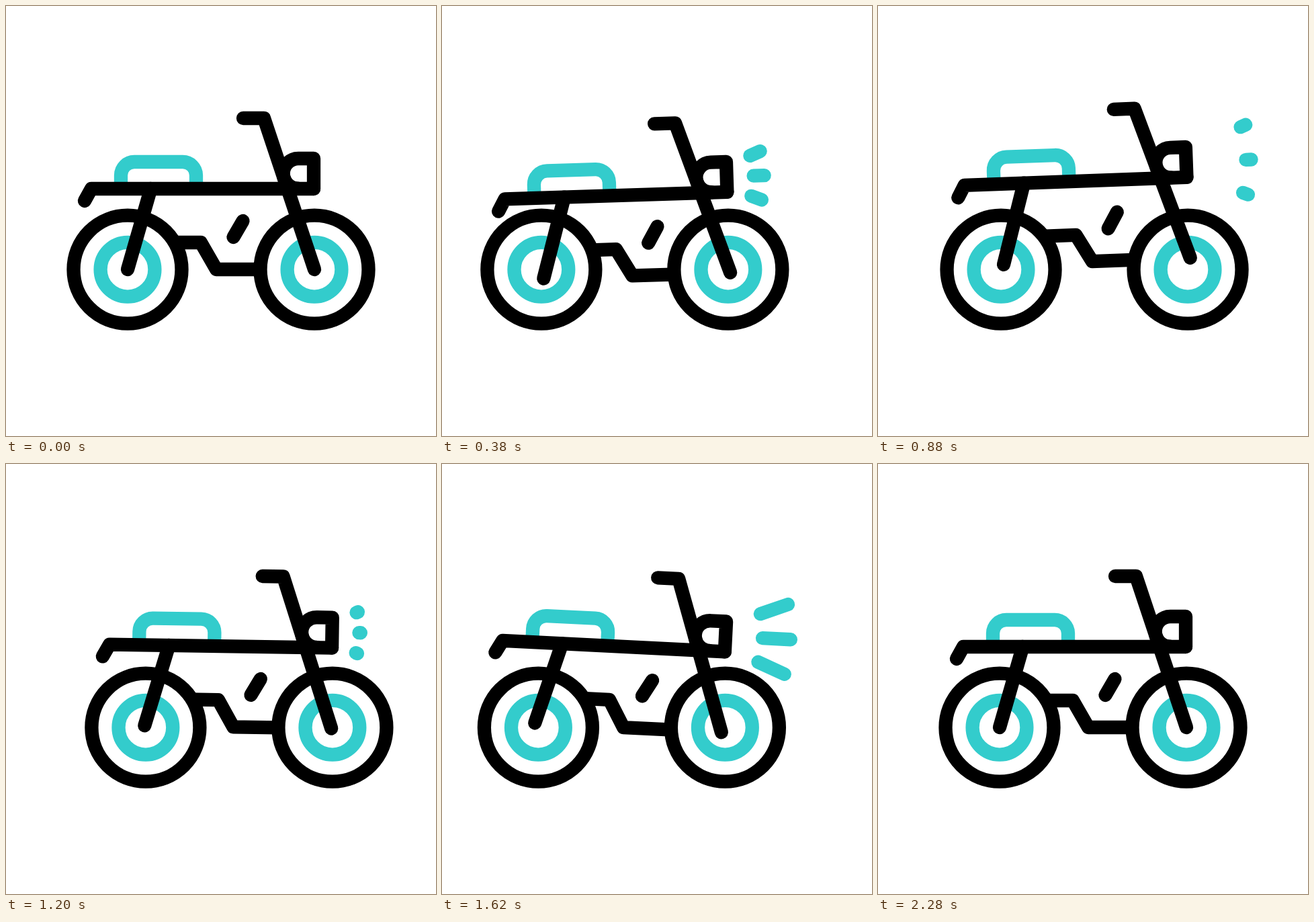
Animation, 640 px wide and 640 px high, one loop 2400 ms. Source, as an HTML page with a canvas:

```html
<!DOCTYPE html>
<html lang="en">
<head>
<meta charset="utf-8">
<title>Motorbike</title>
<style>
  html, body { margin: 0; width: 100%; height: 100%; overflow: hidden; background: #fff; }
  canvas { display: block; width: 100vmin; height: 100vmin; }
</style>
</head>
<body>
<canvas id="stage" width="640" height="640"></canvas>
<script>
const ctx = document.getElementById('stage').getContext('2d');
const BLACK = '#000', TEAL = '#33cccc';
const LOOP = 2400, STEP = 20, LAST = 2280;
const PIVOT = { x: 320, y: 285 };
const REAR = 181, FRONT = 459, AXLE = 392;

const mix = (a, b, k) => a + (b - a) * k;

function ease(t, start, length) {
  const u = Math.min(1, Math.max(0, (t - start) / length));
  return u * u * (3 - 2 * u);
}

// Swings from 0 through evenly spaced peaks and back to 0.
function swing(t, first, step, ...peaks) {
  let value = 0;
  [...peaks, 0].forEach((peak, i) => {
    const k = i ? ease(t, first + (i - 1) * step, step) : ease(t, 0, first);
    value = mix(value, peak, k);
  });
  return value;
}

const shiftAt = t => swing(t, 580, 525, -45.7, 33, -37.7);
const liftAt = t => swing(t, 520, 440, 11.3, -14.3, 10, -9);
const tiltAt = t =>
  -2.95 * (ease(t, 0, 660) - 2 * ease(t, 660, 900) + ease(t, 1560, 550));

function stroke(color) {
  ctx.strokeStyle = color;
  ctx.stroke();
}

function line(color, ...points) {
  ctx.beginPath();
  points.forEach(([x, y]) => ctx.lineTo(x, y));
  stroke(color);
}

function ring(x, r, color) {
  ctx.beginPath();
  ctx.arc(x, AXLE + 0.2, r, 0, Math.PI * 2);
  ctx.fillStyle = '#fff';
  ctx.fill();
  stroke(color);
}

function wheel(x) {
  ring(x, 80.5, BLACK);
  ring(x, 40.4, TEAL);
}

function seat() {
  ctx.beginPath();
  ctx.moveTo(171, 268);
  ctx.arcTo(171, 232, 191, 232, 20);
  ctx.arcTo(283, 232, 283, 252, 20);
  ctx.lineTo(283, 268);
  stroke(TEAL);
}

function headlamp() {
  ctx.beginPath();
  ctx.moveTo(458, 272);
  ctx.lineTo(458, 227);
  ctx.arc(435, 249.3, 22.3, -Math.PI / 2, Math.PI / 2, true);
  stroke(BLACK);
}

// Each ray shoots its head outwards, then the tail catches up.
function rays(t, start) {
  const length = 400, delay = 335;
  if (t <= start || t >= start + delay + length) return;
  const head = ease(t, start, length), tail = ease(t, start + delay, length);
  for (const side of [-1, 0, 1]) {
    const bend = Math.abs(side);
    const point = k => [
      mix(498 - 4.3 * bend, 555 - 6.5 * bend, k),
      249 + side * mix(30, 52, k)
    ];
    line(TEAL, point(tail), point(head));
  }
}

function engine() {
  line(BLACK, [245, 352], [290, 352], [313, AXLE], [380, AXLE]);
  line(BLACK, [352.5, 320], [338.5, 344]);
}

function body(t) {
  seat();
  line(BLACK, [REAR, AXLE], [215.5, 272]);
  line(BLACK, [353, 167], [384, 167], [FRONT, AXLE]);
  line(BLACK, [117, 290], [127, 272], [458, 272]);
  headlamp();
  rays(t, 240);
  rays(t, 1150);
}

function draw(t) {
  const shift = shiftAt(t), lift = liftAt(t);
  const tilt = tiltAt(t) * Math.PI / 180;

  const onBody = paint => {
    ctx.save();
    ctx.translate(PIVOT.x + shift, PIVOT.y + lift);
    ctx.rotate(tilt);
    ctx.translate(-PIVOT.x, -PIVOT.y);
    paint(t);
    ctx.restore();
  };

  ctx.fillStyle = '#fff';
  ctx.fillRect(0, 0, 640, 640);
  ctx.lineWidth = 20.3;
  ctx.lineCap = ctx.lineJoin = 'round';
  onBody(engine);
  wheel(REAR + shift);
  wheel(FRONT + shift);
  onBody(body);
}

const begin = performance.now();
function tick() {
  const t = (performance.now() - begin) % LOOP;
  draw(Math.min(LAST, Math.floor(t / STEP) * STEP));
  requestAnimationFrame(tick);
}
tick();
</script>
</body>
</html>
```
